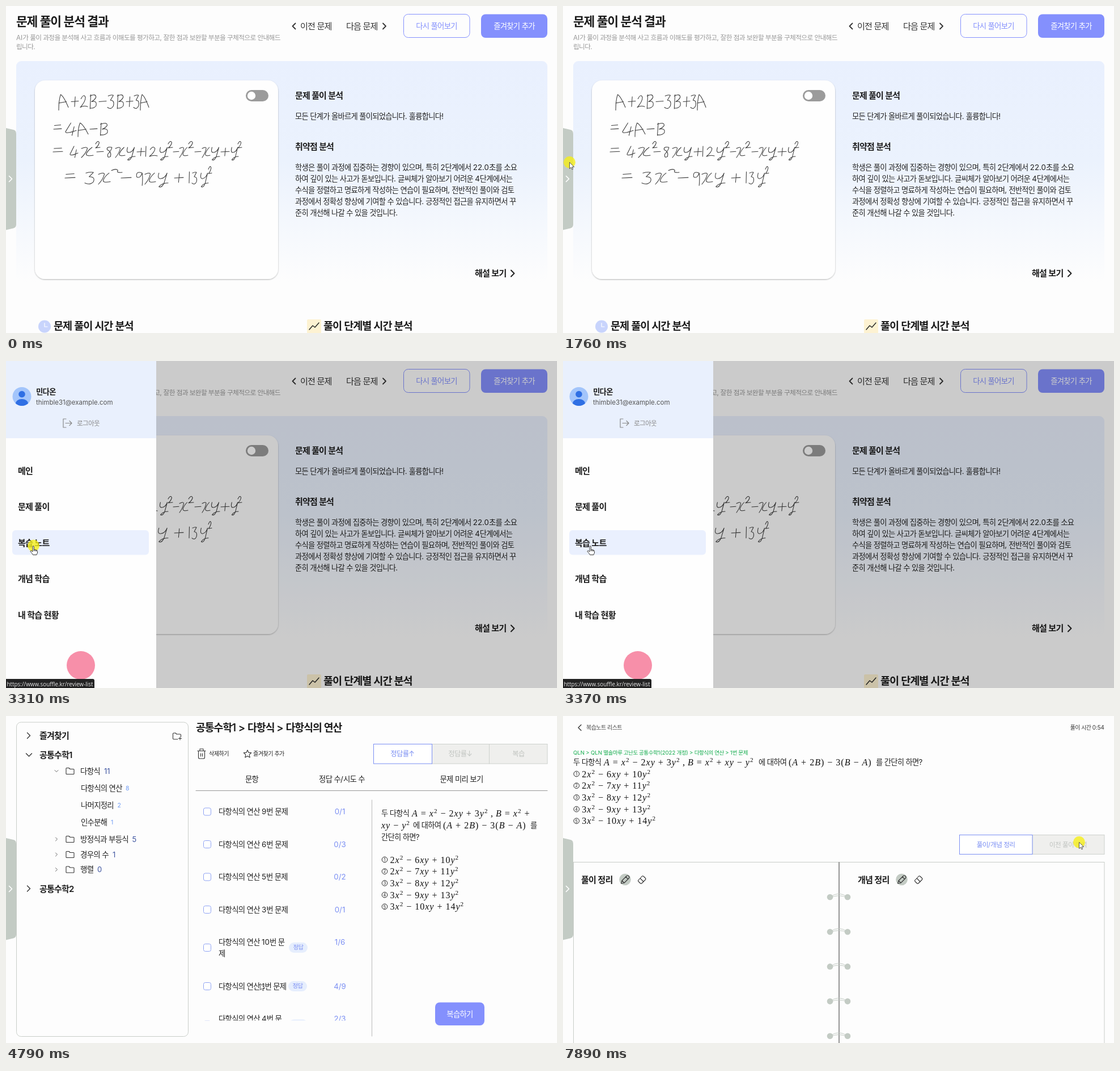
Animation of 972x576 px, one loop 8000 ms. Source, as an HTML page:

```html
<!DOCTYPE html>
<html lang="ko">
<head>
<meta charset="utf-8">
<style>
html, body { margin: 0; width: 100%; height: 100%; overflow: hidden; background: #fdfdfd; }
svg { display: block; width: 972px; height: 576px; font-family: Inter, "Noto Sans CJK KR", "Noto Sans CJK", sans-serif; }
text { word-spacing: -.04em; white-space: pre; }
.k { letter-spacing: -.055em; }
.m { font-family: "Liberation Serif", serif; letter-spacing: .06em; word-spacing: 0; }
.line { fill: none; stroke: #333; stroke-linecap: round; stroke-linejoin: round; }
.pen path { fill: none; stroke: #3a3a3a; stroke-width: 1.05; stroke-linecap: round; stroke-linejoin: round; vector-effect: non-scaling-stroke; }

#analysis, #review, #solve, #empty, #filled, #status, #hover, #press, #arrow, #hand { animation: 8s step-end infinite; }
#analysis { animation-name: analysis; }
#review { animation-name: review; }
#solve { animation-name: solve; }
#empty { animation-name: empty; }
#filled { animation-name: filled; }
#status { animation-name: status; }
#hover { animation-name: hover; }
#press { animation-name: press; }
#arrow { animation-name: arrow; }
#hand { animation-name: hand; }
#drawer { animation: drawer 8s infinite; }
#dim { animation: dim 8s infinite; }
#cursor { animation: cursor 8s ease-in-out infinite; }

@keyframes analysis { 0% { opacity: 1 } 43.7%, 100% { opacity: 0 } }
@keyframes review { 0% { opacity: 0 } 43.7% { opacity: 1 } 80.8%, 100% { opacity: 0 } }
@keyframes solve { 0% { opacity: 0 } 80.8%, 100% { opacity: 1 } }
@keyframes empty { 0% { opacity: 1 } 59.8%, 100% { opacity: 0 } }
@keyframes filled { 0% { opacity: 0 } 59.8%, 100% { opacity: 1 } }
@keyframes status { 0% { opacity: 0 } 31.5% { opacity: 1 } 50%, 100% { opacity: 0 } }
@keyframes hover { 0% { opacity: 0 } 31.5% { opacity: 1 } 47%, 100% { opacity: 0 } }
@keyframes hand { 0% { opacity: 0 } 31.5% { opacity: 1 } 49.2%, 100% { opacity: 0 } }
@keyframes arrow { 0% { opacity: 1 } 31.5% { opacity: 0 } 49.2%, 100% { opacity: 1 } }
@keyframes press {
  0% { opacity: 0 } 21.05% { opacity: 1 } 22.7% { opacity: 0 }
  41.3% { opacity: 1 } 42.05% { opacity: 0 } 58.2% { opacity: 1 } 59.8% { opacity: 0 }
  78.95% { opacity: 1 } 80.8% { opacity: 0 } 98.55%, 100% { opacity: 1 }
}
@keyframes drawer {
  0%, 23% { transform: translateX(-266px); animation-timing-function: cubic-bezier(0, 0, .2, 1) }
  25.81%, 43.75% { transform: none; animation-timing-function: cubic-bezier(.4, 0, .6, 1) }
  46.15%, 100% { transform: translateX(-266px) }
}
@keyframes dim {
  0%, 23% { opacity: 0; animation-timing-function: cubic-bezier(0, 0, .2, 1) }
  24.3%, 43.75% { opacity: .2; animation-timing-function: cubic-bezier(.4, 0, .6, 1) }
  46.15%, 100% { opacity: 0 }
}
@keyframes cursor {
  0%, 2% { transform: translate(885px, 580px) }
  10.2% { transform: translate(-3px, 285px) }
  14.3%, 18% { transform: translate(-3px, 284px) }
  21%, 28.2% { transform: translate(11px, 275px) }
  36.2%, 48.5% { transform: translate(48px, 325px) }
  54.8%, 63% { transform: translate(448px, 471px) }
  73.2%, 85.5% { transform: translate(791px, 526px); animation-timing-function: ease-in }
  88.2% { transform: translate(773px, 440px); animation-timing-function: ease-out }
  95.2%, 95.7% { transform: translate(901px, 237px) }
  98.5%, 100% { transform: translate(910px, 222px) }
}
</style>
</head>
<body>
<svg id="stage" viewBox="0 0 972 576"></svg>
<script>
const BLUE = '#8490fd', SOFT = '#7b8ff3', SAGE = '#c3cbc4', PALE = '#c0c4c0';
const BOLD = 'font-weight="600"', MID = 'text-anchor="middle"';

const text = (x, y, size, s, fill = '#222', extra = '') =>
  `<text x="${x}" y="${y}" font-size="${size}" fill="${fill}" ${extra}>${s.replace(/[가-힣]+/g, '<tspan class="k">$&</tspan>')}</text>`;
const bold = (x, y, size, s) => text(x, y, size, s, '#1c1c1c', BOLD);
const mid = (x, y, size, s, fill, extra = '') => text(x, y, size, s, fill, MID + ' ' + extra);
const math = (x, y, s) => `<text class="m" x="${x}" y="${y}" font-size="16.1" fill="#111">${s
  .replace(/[ABxy]/g, '<tspan font-style="italic">$&</tspan>')
  .replace(/²/g, '<tspan font-size="11.2" baseline-shift="6px">2</tspan>')}</text>`;
const rect = (x, y, w, h, r, fill, extra = '') =>
  `<rect x="${x}" y="${y}" width="${w}" height="${h}" rx="${r}" fill="${fill}" ${extra}/>`;
const line = (d, width = 1.2, color = '#333') =>
  `<path class="line" d="${d}" style="stroke:${color};stroke-width:${width}"/>`;
const circle = (x, y, r, fill, extra = '') => `<circle cx="${x}" cy="${y}" r="${r}" fill="${fill}" ${extra}/>`;
const right = (x, y, r, width, color) => line(`M${x} ${y - r}l${r} ${r}l${-r} ${r}`, width, color);
const left = (x, y, r, width, color) => line(`M${x} ${y - r}l${-r} ${r}l${r} ${r}`, width, color);
const down = (x, y, r, width, color) => line(`M${x - r} ${y - r / 2}l${r} ${r}l${r} ${-r}`, width, color);
const group = (id, ...parts) => `<g id="${id}">${parts.join('')}</g>`;
const shift = (x, y, s) => `<g transform="translate(${x} ${y})">${s}</g>`;

// Handwritten glyphs, each in a 10 by 10 box
const glyphs = {
  A: 'M0 11Q0 4 2 0Q5 1 10 9M0 6L8 5',
  B: 'M2 0L1 10M1 1Q9-1 9 2Q7 4 3 5Q11 4 9 8Q6 10 1 9.5',
  '+': 'M0 5L10 4.6M5.5 1.5L4.6 8.5',
  '-': 'M0 5L10 4.6',
  '=': 'M1 2L9 1.6M0 5L10 4.6',
  1: 'M5 0L4 9',
  2: 'M1 3Q5-1 7 2Q7 5 0 9Q5 7.5 10 8.5',
  3: 'M1 1Q5 0 8 .5L4 4Q10 4 8 8Q5 11 0 9',
  4: 'M5 0L0 7Q0 9 10 6M8 3L6 10',
  8: 'M9 1Q1 0 2 3Q9 5 7 9Q2 11 3 7Q9 3 9 1',
  9: 'M8 1Q0-1 1 4Q5 6 8 1Q9 5 8 11',
  x: 'M0 2Q5 0 5 2Q4 6 0 10M9 1Q5 4 4 7Q4 9 10 8',
  y: 'M1 1Q-1 6 3 5.5Q7 5 9 1L6 9Q4 13 1 12Q4 9 10 9',
  s: 'M0-2Q6-6 8-3Q6 0 0 1.5L10 1',
  '~': 'M0-1Q5-3 6-1Q4 1 10 .5'
};
const write = (y, h, marks) => marks.split(' ').map(mark => {
  const [x, w] = mark.slice(1).split(',');
  return `<path transform="translate(${x} ${y}) scale(${w / 10} ${h / 10})" d="${glyphs[mark[0]]}"/>`;
}).join('');

const handwriting = `<g class="pen">${[
  write(156, 25, 'A93,17 +115,13 2131,13 B147,13 -164,13 3179,13 B195,13 +212,12 3225,11 A237,15'),
  write(206, 22, '=84,14 4105,19 A127,18 -148,13 B165,15'),
  write(247, 20, '=83,17 4113,14 x133,21 s158,8 -160,12 8176,12 x193,17 y213,15 +231,14 1244,6 2253,14 y271,15 s286,8 -295,10 x306,15 s322,9 -333,11 x346,14 y362,15 +379,15 y397,13 s409,7'),
  write(292, 22, '=104,18 3139,19 x163,21 ~186,19 -203,18 9229,14 x245,19 y268,18 +297,16 1321,5 3328,10 y343,14 s357,6')
].join('')}</g>`;

const toggle = rect(423, 148, 40, 20, 10, '#9b9b9b') + circle(433, 158, 7.2, '#fff');
const advice = [
  '학생은 풀이 과정에 집중하는 경향이 있으며, 특히 2단계에서 22.0초를 소요',
  '하여 깊이 있는 사고가 돋보입니다. 글씨체가 알아보기 어려운 4단계에서는',
  '수식을 정렬하고 명료하게 작성하는 연습이 필요하며, 전반적인 풀이와 검토',
  '과정에서 정확성 향상에 기여할 수 있습니다. 긍정적인 접근을 유지하면서 꾸',
  '준히 개선해 나갈 수 있을 것입니다.'
].map((s, i) => text(510, 289 + i * 20, 13.3, s));

const analysis = group('analysis',
  bold(18, 34.5, 21.5, '문제 풀이 분석 결과'),
  text(18, 59.5, 11.7, 'AI가 풀이 과정을 분석해 사고 흐름과 이해도를 평가하고, 잘한 점과 보완할 부분을 구체적으로 안내해드', '#999'),
  text(18, 76, 11.7, '립니다.', '#999'),
  left(510.5, 35.5, 5, 1.8), text(519, 40.5, 15.1, '이전 문제', '#333', 'font-weight="500"'),
  text(600, 40.5, 15.1, '다음 문제', '#333', 'font-weight="500"'), right(665, 35.5, 5, 1.8),
  rect(701.5, 14.5, 116.5, 41, 8, '#fdfdfd', `stroke="${BLUE}"`), mid(759.5, 40, 13.4, '다시 풀어보기', BLUE),
  rect(838, 14.5, 117, 41.5, 8, BLUE), mid(896.5, 40, 13.4, '즐겨찾기 추가', '#fff'),
  rect(18, 97, 937, 390, 9, 'url(#panel)'),
  rect(51, 131, 429, 350, 18, '#fefefe', 'filter="url(#soft)"'),
  handwriting, toggle,
  bold(510, 163, 15, '문제 풀이 분석'), text(510, 199, 13.3, '모든 단계가 올바르게 풀이되었습니다. 훌륭합니다!'),
  bold(510, 253, 15, '취약점 분석'), ...advice,
  bold(827, 476, 15.1, '해설 보기'), right(891, 471, 5.5, 2, '#222'),
  circle(68, 564.5, 11, '#c8d4fc'), line('M68 558.5v6.5h5', 1.2, '#fff'), bold(84, 570, 18.6, '문제 풀이 시간 분석'),
  rect(531, 552, 25, 25, 2, '#fdf2d2'), line('M535 570l6-7 4 3 7-8', 1.4, '#222'), bold(560, 570, 18.6, '풀이 단계별 시간 분석'));

const folder = (x, y) => line(`M${x + 1} ${y}h4l2 2h6q1 0 1 1v7q0 1-1 1h-12q-1 0-1-1v-9q0-1 1-1z`, 1.1);
const branch = (y, name, count, x, open) =>
  (open ? down(89, y, 3, 1, '#666') : right(87.5, y, 3, 1, '#666')) + folder(106, y - 5.5) +
  text(131, y + 4.8, 13.5, name) + text(x, y + 4.8, 13, count, '#3f55a0');
const leaf = (y, name, count, x) => text(132, y + 4.8, 13.4, name) + text(x, y + 4, 10.5, count, '#6f9bf3');

const row = (y, names, ratio, badgeX, topY = y) =>
  rect(348.5, y - 6.5, 13, 13, 3, '#fff', 'stroke="#8fa3f3"') +
  names.map((s, i) => text(375, topY + 4.8 + i * 20, 13.4, s)).join('') +
  mid(589, topY + 4.8, 13.3, ratio, SOFT) +
  (badgeX ? rect(badgeX, y - 9, 33, 18, 9, '#e6eefd') + mid(badgeX + 16.5, y + 3.3, 10.4, '정답', SOFT) : '');
const item = n => `다항식의 연산 ${n}번 문제`;

const options = ['2x² − 6xy + 10y²', '2x² − 7xy + 11y²', '3x² − 8xy + 12y²', '3x² − 9xy + 13y²', '3x² − 10xy + 14y²']
  .map((s, i) => shift(0, i * 20.7,
    circle(5.5, 0, 4.8, 'none', 'stroke="#222"') + mid(5.5, 2.7, 7.5, `${i + 1}`) + math(15, 5.5, s))).join('');

const star = 'M426 60l2 4.4 4.8.5-3.6 3.2 1 4.8-4.2-2.4-4.2 2.4 1-4.8-3.6-3.2 4.8-.5z';
const review = group('review',
  rect(18.5, 11, 303, 553.5, 8, '#fdfdfd', 'stroke="#c9cec9"'),
  right(37.5, 34.5, 5, 1.4), bold(59, 40, 15, '즐겨찾기'),
  line('M303 41h-7q-1.5 0-1.5-1.5v-8q0-1.500 1.500-1.500h3l2 2h6q1.500 0 1.500 1.500v3M304.500 39.500h5M307 37v5', 1.1),
  down(40.5, 68.5, 5, 1.4), bold(59, 73.5, 15, '공통수학1'),
  branch(97, '다항식', '11', 173, true),
  leaf(127, '다항식의 연산', '8', 211), leaf(157, '나머지정리', '2', 196.5), leaf(187, '인수분해', '1', 185),
  branch(217, '방정식과 부등식', '5', 222.5), branch(244, '경우의 수', '1', 188), branch(270.5, '행렬', '0', 161),
  right(37.5, 304, 5, 1.4), bold(59, 309.5, 15, '공통수학2'),
  bold(335, 27, 18.3, '공통수학1 > 다항식 > 다항식의 연산'),
  line('M338 61.5h14M342 61v-3h6v3M339.5 62v11q0 2 2 2h7q2 0 2-2v-11M343.5 66v5M346.5 66v5', 1.1),
  text(358, 70.2, 10.1, '삭제하기'), line(star, 1.1), text(436, 70.2, 10.1, '즐겨찾기 추가'),
  rect(751.5, 49.5, 203.5, 34.5, 0, '#efefed', 'stroke="#cdd1cd"'), line('M852.5 50v34', 1, '#cdd1cd'),
  rect(648.5, 49.5, 103, 34.5, 0, '#fff', `stroke="${SOFT}"`),
  mid(699.5, 71, 12.4, '정답률↑', SOFT), mid(801.5, 71, 12.4, '정답률↓', PALE), mid(904, 71, 12.4, '복습', PALE),
  mid(433.5, 115.5, 13.4, '문항'), mid(592.5, 115.5, 13.4, '정답 수/시도 수'), mid(803.5, 115.5, 13.4, '문제 미리 보기'),
  line('M335 131.5H955', 1, '#999'), line('M645.5 148V564', 1, '#bbb'),
  '<g clip-path="url(#list)">',
  row(168.5, [item(9)], '0/1'), row(226, [item(6)], '0/3'), row(283.5, [item(5)], '0/2'), row(341, [item(3)], '0/1'),
  row(408, ['다항식의 연산 10번 문', '제'], '1/6', 499, 398.5),
  row(476, [item(1)], '4/9', 498), row(543.5, ['다항식의 연산 4번 문', '제'], '2/3', 499, 533.5), '</g>',
  group('empty', mid(800.5, 324, 13.35, '문제를 선택해주세요', '#777'),
    rect(757, 504.5, 87, 40.5, 8, '#eff0ee'), mid(800.5, 529.5, 13.4, '복습하기', '#a9b0a9')),
  group('filled',
    text(662, 176, 13.3, '두 다항식'), math(716, 177, 'A = x² − 2xy + 3y²'), math(855, 177, ','), math(864, 177, 'B = x² +'),
    math(662, 197.5, 'xy − y²'), text(718, 197, 13.3, '에 대하여'), math(771, 197.5, '(A + 2B) − 3(B − A)'), text(925, 197, 13.3, '를'),
    text(662, 217.5, 13.3, '간단히 하면?'), shift(662.5, 253, options),
    rect(757, 504.5, 87, 40.5, 8, BLUE), mid(800.5, 529.5, 13.4, '복습하기', '#fff')));

const ring = y => line(`M471 ${y}Q486.5 ${y - 12} 502 ${y}M471 ${y + 1}Q486.5 ${y - 6} 502 ${y + 1}`, 1, SAGE) +
  circle(471, y, 5.3, SAGE) + circle(502, y, 5.3, SAGE);
const tools = x => circle(x, 288, 10.3, SAGE) +
  shift(x, 288, line('M-7 7l1.5-5 8-8q2-2 4 0t0 4l-8 8zM1-5l4 4M-5.5 2l3.5 3.5', 1.1)) +
  shift(x + 29.7, 288, line('M-6 1l6-6.5q1.5-1.5 3 0l3 3q1.5 1.5 0 3l-6 6q-1.5 1.5-3 0l-3-3q-1.5-1.5 0-2.5zM-3-2l6 6', 1.1));

const solve = group('solve',
  left(32, 20.5, 5, 1.3), text(41, 24.2, 10, '복습노트 리스트', '#444'),
  text(955, 24.2, 9.9, '풀이 시간 0:54', '#333', 'text-anchor="end"'),
  text(18, 68, 9.6, 'QLN > QLN 별솔마루 고난도 공통수학1(2022 개정) > 다항식의 연산 > 1번 문제', '#14ad4e'),
  text(18, 86, 13.3, '두 다항식'), math(72, 87, 'A = x² − 2xy + 3y²'), math(211, 87, ','), math(220, 87, 'B = x² + xy − y²'),
  text(345, 86, 13.3, '에 대하여'), math(398, 87, '(A + 2B) − 3(B − A)'), text(552, 86, 13.3, '를 간단히 하면?'),
  shift(18.3, 102, options),
  rect(828, 209.5, 127, 34, 0, '#efefed', 'stroke="#cdd1cd"'), rect(699.5, 209.5, 128.5, 34, 0, '#fff', `stroke="${SOFT}"`),
  mid(763.5, 231, 11.7, '풀이/개념 정리', SOFT), mid(891, 231, 11.7, '이전 풀이 분석', PALE),
  rect(18.5, 257.5, 936.5, 340, 0, '#fdfdfd', 'stroke="#c8cdc8"'), line('M487 258V580', 1.8, '#8a8a8a'),
  bold(32, 293.5, 15.1, '풀이 정리'), tools(109.5), bold(520, 293.5, 15.1, '개념 정리'), tools(597.5),
  ...[0, 1, 2, 3, 4].map(i => ring(319 + i * 61.2)));

const menu = ['메인', '문제 풀이', '복습 노트', '개념 학습', '내 학습 현황']
  .map((s, i) => bold(21, 198.5 + i * 63.5, 15.1, s));
const drawer = group('drawer',
  rect(0, 0, 265, 576, 0, '#fefefe'), rect(0, 0, 265, 136, 0, '#e9f0fd'),
  circle(28, 62.5, 16.5, '#a3c5fb'),
  `<g clip-path="url(#face)">${circle(28, 58.5, 5.8, '#2f6fe4')}<ellipse cx="28" cy="75" rx="11" ry="8" fill="#2f6fe4"/></g>`,
  bold(53, 58.5, 13.4, '민다온'), text(53, 77, 11.5, 'thimble31@example.com', '#555'),
  line('M106 102h-5v15h5M105 109.5h11M112 105.5l4 4-4 4', 1.2, '#888'), text(125, 113.5, 11.6, '로그아웃', '#888'),
  rect(11, 298, 241, 43.5, 6, '#eaf0fe', 'id="hover"'), ...menu,
  circle(132, 536, 25, '#f78fa9'));

const status = group('status',
  '<path d="M0 560H153q3 0 3 3V576H0z" fill="#232323"/>',
  text(1.5, 572.5, 9.9, 'https://www.souffle.kr/review-list', '#e8e8e8', 'style="font-family:\'Open Sans\',sans-serif"'));

const cursor = group('cursor',
  circle(.5, .3, 10.5, '#f6ee14', 'id="press" fill-opacity=".78"'),
  '<path id="arrow" d="M.5 .3V11.5L3.2 9.2 5 13 6.7 12.2 5 8.5H8.7Z" fill="#fff" stroke="#333" stroke-width=".8"/>',
  '<path id="hand" d="M-1 2Q0-1 1.3 2V7L5.5 8Q7.5 8.5 7.5 10.5V13Q6.5 14.5 6 16.5H-.5Q-2 13.5-5 10.5Q-4.5 8-2.5 9.8L-1 11ZM1.3 7v3M3.4 7.6v2.6M5.5 8v2.5" fill="#fff" stroke="#222" stroke-width=".9"/>');

const defs = `<defs>
  <linearGradient id="panel" x2="0" y2="1"><stop stop-color="#e9f0fe"/><stop offset=".45" stop-color="#ebf2fd"/><stop offset="1" stop-color="#fdfdfd"/></linearGradient>
  <filter id="soft"><feDropShadow dx="0" dy="1" stdDeviation="1.3" flood-opacity=".3"/></filter>
  <clipPath id="list"><rect x="330" y="140" width="310" height="396.5"/></clipPath>
  <clipPath id="face"><circle cx="28" cy="62.5" r="16.5"/></clipPath></defs>`;
const handle = `<path d="M0 215L13 218Q18 219 18 225V385Q18 390 13 391.5L0 394.5Z" fill="${SAGE}"/>` + right(5.5, 304.5, 5, 1.6, '#fff');

document.getElementById('stage').innerHTML = [defs, analysis, review, solve, handle,
  rect(0, 0, 972, 576, 0, '#000', 'id="dim"'), drawer, status, cursor].join('');
</script>
</body>
</html>
```
